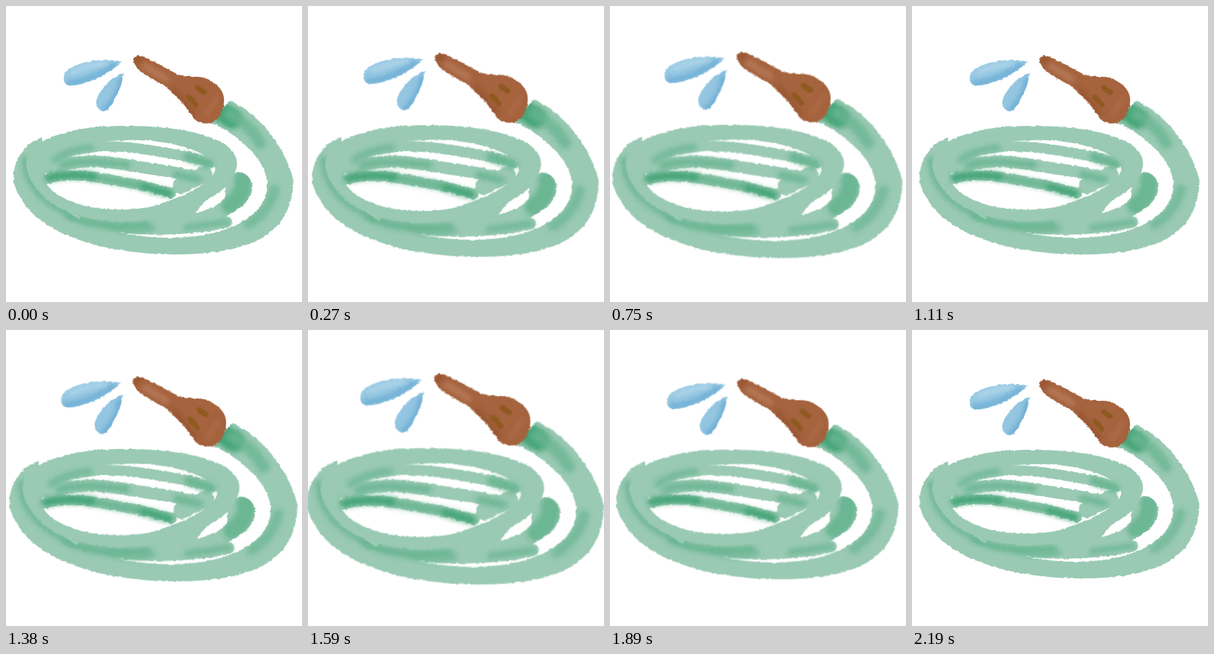
An HTML page for the animation above (2220 ms loop, 410 by 410 pixels).

```html
<!DOCTYPE html>
<html lang="en">
<head>
<meta charset="utf-8">
<title>Garden hose</title>
<style>
  html, body { margin: 0; width: 100%; height: 100%; overflow: hidden; background: #fff; }
  svg { position: absolute; inset: 0; width: 100%; height: 100%; overflow: visible;
        transform-origin: 50% 50.3%; will-change: transform; }
  path { stroke-linecap: round; stroke-linejoin: round; }
  .hose { fill: #9acab4; }
  .band { fill: none; stroke: #9acab4; }
  .soft { fill: none; filter: url(#soft); }
  .mid { stroke: #6bb693; }
  .deep { stroke: #45a578; }
</style>
</head>
<body>
<svg id="hose" viewBox="0 0 410 410">
  <defs>
    <filter id="rough" x="-5%" y="-5%" width="110%" height="110%" color-interpolation-filters="sRGB">
      <feTurbulence type="fractalNoise" baseFrequency=".2" numOctaves="2" seed="4" result="n"/>
      <feDisplacementMap in="SourceGraphic" in2="n" scale="3.2" xChannelSelector="R" yChannelSelector="G"/>
      <feGaussianBlur stdDeviation=".75"/>
    </filter>
    <filter id="soft" filterUnits="userSpaceOnUse" x="0" y="0" width="410" height="410" color-interpolation-filters="sRGB">
      <feGaussianBlur stdDeviation="3.2"/>
    </filter>
    <path id="coil" d="M50 182C14 194 1 238 18 261C42 315 135 344 235 344C335 344 398 318 398 240C385 190 345 145 310 131L284 161C330 183 363 218 362 250C360 290 310 321 225 321C180 321 140 312 100 296L50 255Z"/>
    <path id="bulb" d="M320 230C338 230 346 248 338 263C328 284 290 303 240 308C170 310 100 300 60 270L100 280L240 284L303 258L304 238Z"/>
    <path id="nozzle" d="M177 77C176 69 184 67 192 71C212 80 230 92 244 97C258 99 270 96 281 102C293 109 302 117 302 130C302 145 294 160 283 162C273 164 265 162 259 154C250 138 234 123 218 109C202 101 181 91 177 77Z"/>
    <path id="jet" d="M160 77C140 72 105 75 88 87C78 94 77 109 88 110C106 111 142 96 160 77Z"/>
    <path id="drop" d="M163 92C149 97 129 115 125 132C124 142 134 150 141 143C150 130 161 113 163 92Z"/>
    <clipPath id="inCoil"><use href="#coil"/></clipPath>
    <clipPath id="inBulb"><use href="#bulb"/></clipPath>
    <clipPath id="inNozzle"><use href="#nozzle"/></clipPath>
    <clipPath id="inJet"><use href="#jet"/></clipPath>
    <clipPath id="inDrop"><use href="#drop"/></clipPath>
  </defs>

  <g filter="url(#rough)">
    <!-- outer turn -->
    <use href="#coil" class="hose"/>
    <g clip-path="url(#inCoil)">
      <path class="soft deep" stroke-width="28" d="M294 144L313 156"/>
      <path class="soft mid" stroke-width="16" opacity=".8" d="M310 150C330 160 343 174 352 190"/>
      <path class="soft mid" stroke-width="14" opacity=".7" d="M372 254C366 278 352 292 336 302"/>
      <path class="soft mid" stroke-width="9" opacity=".85" d="M26 212C27 248 52 274 92 290"/>
    </g>

    <!-- lower turns -->
    <path class="band" stroke-width="16" d="M110 296C170 313 250 312 305 299"/>
    <use href="#bulb" class="hose"/>
    <g clip-path="url(#inBulb)">
      <path class="soft mid" stroke-width="24" d="M328 240C330 258 322 268 310 276"/>
    </g>
    <path class="soft mid" stroke-width="9" opacity=".8" d="M250 307L306 299"/>
    <path class="soft mid" stroke-width="10" d="M86 290C112 302 150 308 196 303"/>
    <path class="soft mid" stroke-width="6" opacity=".8" d="M142 305C160 314 184 313 204 308"/>

    <!-- front turn -->
    <path class="hose" d="M28 222C28 180 100 165 170 166C240 166 322 181 320 219C316 262 240 298 160 298C95 298 40 273 28 222Z"/>
    <path fill="#fff" d="M53 238C56 205 108 187 165 186C220 184 288 200 290 226C286 246 244 264 208 276C180 284 138 284 106 276C78 268 56 254 53 238Z"/>
    <path fill="#fff" d="M263 287C269 273 286 261 303 257C307 265 298 277 263 287Z"/>

    <!-- inner turns -->
    <path class="band" stroke-width="14" d="M58 219C90 190 150 192 195 199C235 205 262 210 284 217"/>
    <path class="band" stroke-width="16" d="M61 226C98 210 140 215 172 221C215 228 245 231 268 238"/>
    <path class="band" stroke-width="14" d="M58 239C95 228 140 240 175 246C200 251 214 255 229 259"/>
    <path class="band" stroke-width="22" d="M242 249L275 233"/>
    <path class="soft mid" stroke-width="9" opacity=".8" d="M67 213C83 202 100 198 118 196"/>
    <path class="soft mid" stroke-width="12" d="M252 209L282 219"/>
    <path class="soft mid" stroke-width="10" opacity=".9" d="M78 220C110 212 140 217 168 220M236 233L266 240"/>
    <path class="soft mid" stroke-width="10" d="M122 237L184 248"/>
    <path class="soft deep" stroke-width="11" d="M59 238C80 233 100 233 120 236M190 250C202 253 212 256 226 260"/>

    <!-- nozzle -->
    <use href="#nozzle" fill="#a5633e"/>
    <g clip-path="url(#inNozzle)">
      <path class="soft" stroke="#bb8060" stroke-width="9" opacity=".75" d="M192 83L222 101"/>
      <path class="soft" stroke="#96532f" stroke-width="6" d="M232 116L260 150M179 77L186 72"/>
      <path class="soft" stroke="#b2704c" stroke-width="7" opacity=".7" d="M277 151L292 128"/>
    </g>
    <path fill="none" stroke="#8f5a20" stroke-width="7" d="M266 114L275 120M253 126L263 137"/>

    <!-- water -->
    <use href="#jet" fill="#98c9e3"/>
    <g clip-path="url(#inJet)">
      <path class="soft" stroke="#6fafd5" stroke-width="8" d="M86 107C108 105 132 95 150 82"/>
      <path class="soft" stroke="#b5d9ec" stroke-width="5" d="M92 92C106 84 122 81 138 79"/>
    </g>
    <use href="#drop" fill="#94c6e1"/>
    <g clip-path="url(#inDrop)">
      <path class="soft" stroke="#6cadd4" stroke-width="8" d="M160 102C157 122 148 134 137 145"/>
    </g>
  </g>
</svg>
<script>
  const LOOP = 2220, GROW = 0.067;
  // [ms, amount of growth]
  const steps = [[0, 0], [648, 1], [864, 0], [1080, 0], [1728, 1], [1944, 0], [LOOP, 0]];
  document.getElementById('hose').animate(
    steps.map(([t, k]) => ({
      offset: t / LOOP,
      transform: `scale(${1 + GROW * k})`,
      easing: 'ease-in-out'
    })),
    { duration: LOOP, iterations: Infinity }
  );
</script>
</body>
</html>
```
